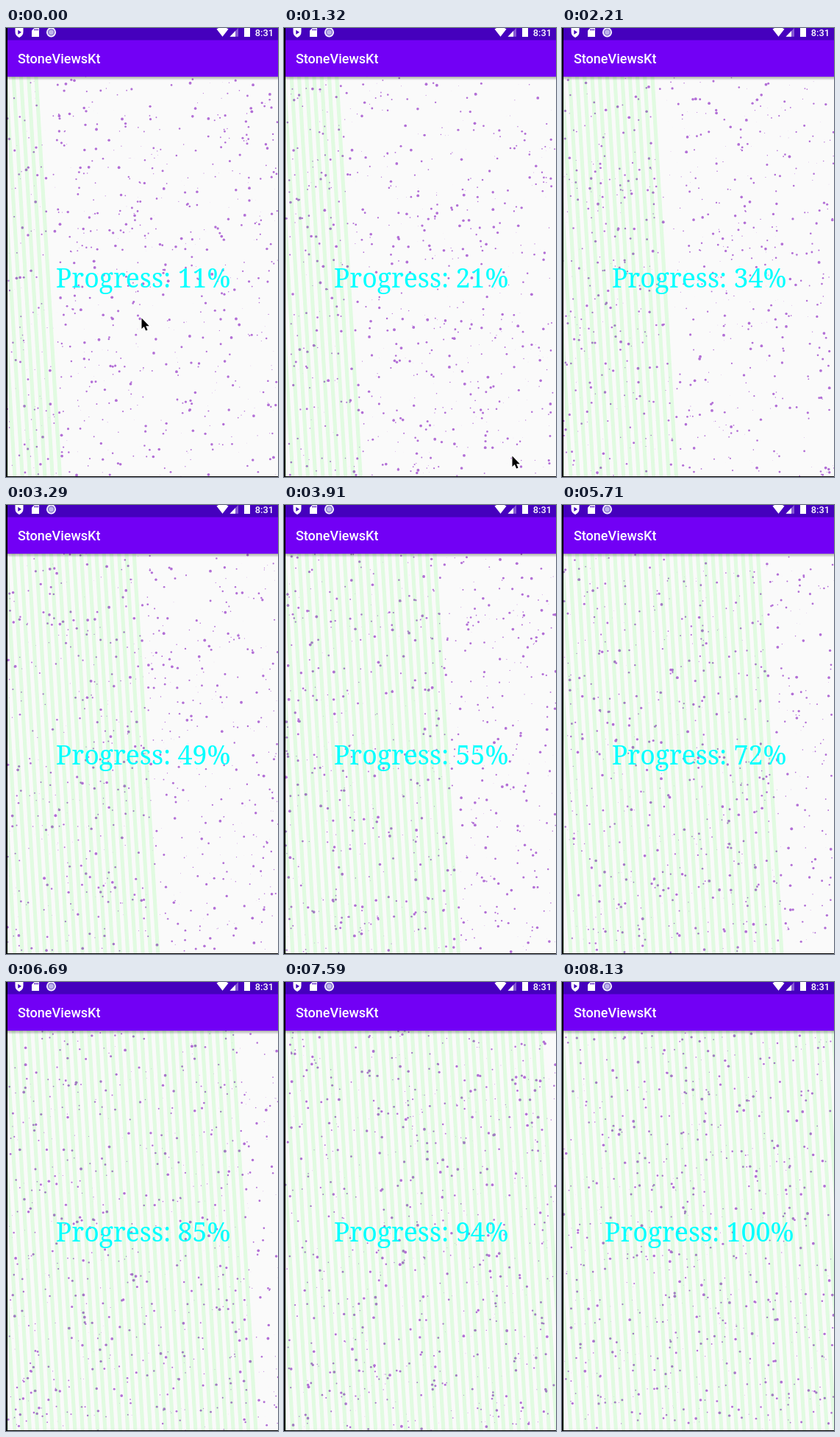
Animation of 370 by 609 pixels, one loop 8.66 s. Source, as an HTML page with a canvas:

```html
<!DOCTYPE html>
<html lang="en">
<head>
<meta charset="utf-8">
<title>Progress</title>
<style>
html, body { margin: 0; width: 100%; height: 100%; overflow: hidden; background: #000; }
canvas { display: block; }
</style>
</head>
<body>
<canvas id="stage" width="370" height="609"></canvas>
<script>
const ctx = document.getElementById('stage').getContext('2d');
const LOOP = 8660, LEFT = 2, TOP = 66, BOTTOM = 608, RIGHT = 370;
const WIDTH = RIGHT - LEFT, HEIGHT = BOTTOM - TOP;

// The view redraws only at these moments.
const redraws = [0, 360, 480, 600, 720, 840, 960, 1080, 1200, 1320, 1500, 1590, 1670,
  1940, 2210, 2390, 2570, 3020, 3290, 3460, 3730, 3910, 4090, 4540, 4810, 4990, 5080,
  5350, 5710, 5800, 5980, 6340, 6520, 6690, 7050, 7230, 7590, 7950, 8130];
const progressKeys = [[0, 11], [1320, 21], [3290, 49], [4810, 63], [5710, 72], [6690, 85], [8130, 100]];

function progressAt(time) {
  const next = progressKeys.findIndex(key => key[0] > time);
  if (next < 0) return 100;
  const [t0, p0] = progressKeys[next - 1], [t1, p1] = progressKeys[next];
  return Math.round(p0 + (p1 - p0) * (time - t0) / (t1 - t0));
}

function randomFrom(seed) {
  return () => {
    seed = (seed + 0x6D2B79F5) | 0;
    let n = Math.imul(seed ^ (seed >>> 15), seed | 1);
    n ^= n + Math.imul(n ^ (n >>> 7), n | 61);
    return ((n ^ (n >>> 14)) >>> 0) / 4294967296;
  };
}

function rect(x, y, w, h, color) {
  ctx.fillStyle = color;
  ctx.fillRect(x, y, w, h);
}

function shape(path, color) {
  ctx.fillStyle = color;
  ctx.fill(new Path2D(path));
}

function disc(x, y, r, color) {
  ctx.fillStyle = color;
  ctx.beginPath();
  ctx.arc(x, y, r, 0, Math.PI * 2);
  ctx.fill();
}

function text(string, x, y, font, color, align) {
  ctx.font = font;
  ctx.fillStyle = color;
  ctx.textAlign = align;
  ctx.fillText(string, x, y);
}

function drawDots(step) {
  const random = randomFrom(step * 7919 + 31);
  for (let i = 0; i < 760; i++) {
    disc(LEFT + random() * WIDTH, TOP + random() * HEIGHT, random() * 1.95, '#b26ed6');
  }
}

function drawStripes(progress) {
  const pitch = 10.25, width = pitch / 2, slant = 32.5;
  const count = Math.floor(progress * 0.36 + 0.34);
  ctx.fillStyle = 'rgba(0, 255, 0, 0.1)';
  for (let i = -3; i <= count; i++) {
    const edge = 2.5 + i * pitch;
    ctx.beginPath();
    ctx.moveTo(edge - width, TOP);
    ctx.lineTo(edge, TOP);
    ctx.lineTo(edge + slant, BOTTOM);
    ctx.lineTo(edge + slant - width, BOTTOM);
    ctx.fill();
  }
}

function drawHeader() {
  rect(LEFT, 0, WIDTH, TOP, '#7200f5');
  rect(LEFT, 0, WIDTH, 16.5, '#4500bd');
  const shadow = ctx.createLinearGradient(0, TOP, 0, TOP + 5);
  shadow.addColorStop(0, 'rgba(0, 0, 0, 0.32)');
  shadow.addColorStop(1, 'rgba(0, 0, 0, 0)');
  rect(LEFT, TOP, WIDTH, 5, shadow);
  text('StoneViewsKt', 16, 48, '500 18px Roboto, sans-serif', '#fff', 'left');
  text('8:31', 364, 11, '500 12.8px Roboto, sans-serif', '#fff', 'right');

  shape('M12.5 0H23.5V5Q23.5 10.5 18 13Q12.5 10.5 12.5 5Z', '#fff');
  shape('M16.3 2.8L21 5.8L16.3 8.8Z', '#4500bd');
  shape('M38.5 0H45V12H35V3.5Z', '#fff');
  for (const x of [38.5, 40.6, 42.7]) rect(x, 1, 1.1, 2.5, '#4500bd');
  disc(61.5, 5.8, 6.6, '#f0ebff');
  disc(61.5, 5.8, 4.6, '#7a62cc');
  disc(61.5, 5.8, 3.4, '#bdb4ea');
  shape('M286.5 1.5Q294.5 -4 302.5 1.5L294.5 11.8Z', '#fff');
  shape('M304.5 11.8L316 0V11.8Z', 'rgba(255, 255, 255, 0.35)');
  shape('M304.5 11.8L312 4V11.8Z', '#fff');
  rect(324, 0, 8, 12, '#fff');
}

function drawCursor(step) {
  if (step > 11) return;
  const f = Math.min(step / 9, 1), ease = f * f * (3 - 2 * f);
  const past = Math.max(step - 9, 0);
  ctx.save();
  ctx.translate(184 + 126 * ease + past * 4, 393 + 187 * ease + past * 13);
  const arrow = new Path2D('M.5 .5V15L3.8 12L6.2 17.5L8.6 16.4L6.2 11.2H10.8Z');
  ctx.lineWidth = 1.6;
  ctx.strokeStyle = '#fff';
  ctx.stroke(arrow);
  ctx.fillStyle = '#000';
  ctx.fill(arrow);
  ctx.restore();
}

function draw(step) {
  const progress = progressAt(redraws[step]);
  rect(0, 0, 370, 609, '#000');
  ctx.save();
  ctx.beginPath();
  ctx.rect(LEFT, 0, WIDTH, BOTTOM);
  ctx.clip();
  rect(LEFT, TOP, WIDTH, HEIGHT, '#fafafa');
  drawDots(step);
  drawStripes(progress);
  text(`Progress: ${progress}%`, 186.6, 352, '35.7px "Noto Serif", serif', '#0ff', 'center');
  drawHeader();
  ctx.restore();
  drawCursor(step);
}

function tick() {
  const time = performance.now() % LOOP;
  draw(redraws.filter(t => t <= time).length - 1);
  requestAnimationFrame(tick);
}
tick();
</script>
</body>
</html>
```
